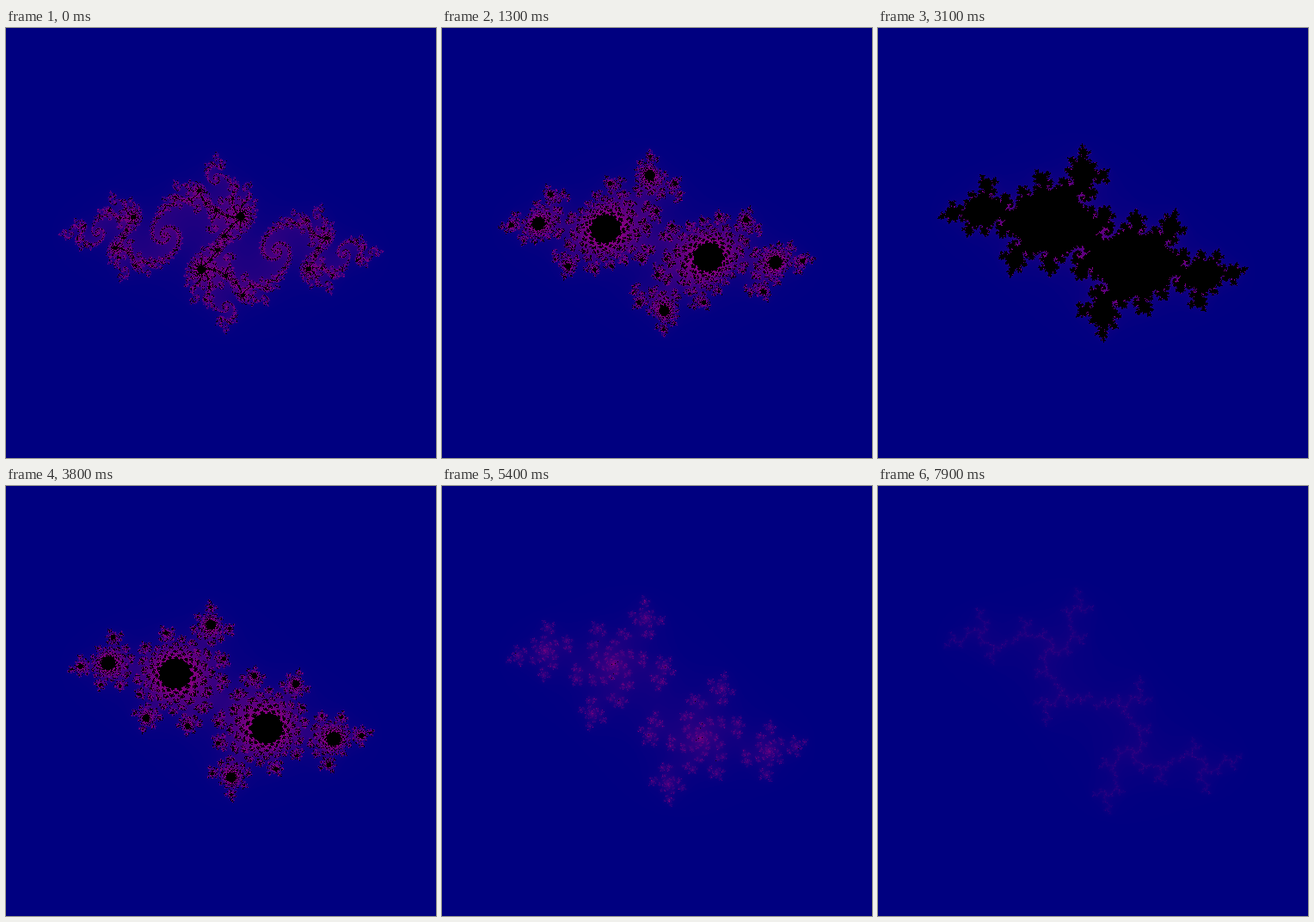
Animation, 500 px wide and 500 px high, one loop 8000 ms. Source, as an HTML page with a canvas:

```html
<!DOCTYPE html>
<html lang="en">
<head>
<meta charset="utf-8">
<title>Julia set morph</title>
<style>
  html, body { margin: 0; width: 100%; height: 100%; overflow: hidden; background: #000080; }
  canvas { display: block; width: 100vw; height: 100vh; image-rendering: pixelated; }
</style>
</head>
<body>
<canvas id="stage" width="500" height="500"></canvas>
<script>
const SIZE = 500, CENTER = (SIZE - 1) / 2, SCALE = SIZE / 4;
const LOOP = 8000, STEP = 100, MAX_ITER = 100;

const ctx = document.getElementById('stage').getContext('2d');
const image = ctx.createImageData(SIZE, SIZE);
const pixels = new Uint32Array(image.data.buffer);

// Navy shading into purple with the escape count; black where nothing escapes.
const rgb = (r, g, b) => (255 << 24 | b << 16 | g << 8 | r) >>> 0;
const palette = Array.from({ length: MAX_ITER + 1 }, (_, n) =>
  n === MAX_ITER ? rgb(0, 0, 0)
                 : rgb(Math.round(Math.min(128, Math.max(0, 1.6 * n - 4))), 0, 128));

function escapeCount(x, y, cx, cy) {
  let n = 0, xx = x * x, yy = y * y;
  while (xx + yy <= 4 && n < MAX_ITER) {
    y = 2 * x * y + cy;
    x = xx - yy + cx;
    xx = x * x;
    yy = y * y;
    n++;
  }
  return n;
}

function draw(step) {
  const cx = -0.788 + 0.00617 * step;
  const cy = -0.1515 - 0.00883 * step;
  const last = pixels.length - 1;
  // The set is symmetric under z -> -z, so half the rows are enough.
  for (let i = 0; i <= last / 2; i++) {
    const x = (i % SIZE - CENTER) / SCALE;
    const y = (Math.floor(i / SIZE) - CENTER) / SCALE;
    pixels[i] = pixels[last - i] = palette[escapeCount(x, y, cx, cy)];
  }
  ctx.putImageData(image, 0, 0);
}

const start = performance.now();
let shown = -1;

function tick() {
  const step = Math.floor((performance.now() - start) % LOOP / STEP);
  if (step !== shown) draw(shown = step);
  requestAnimationFrame(tick);
}
tick();
</script>
</body>
</html>
```
